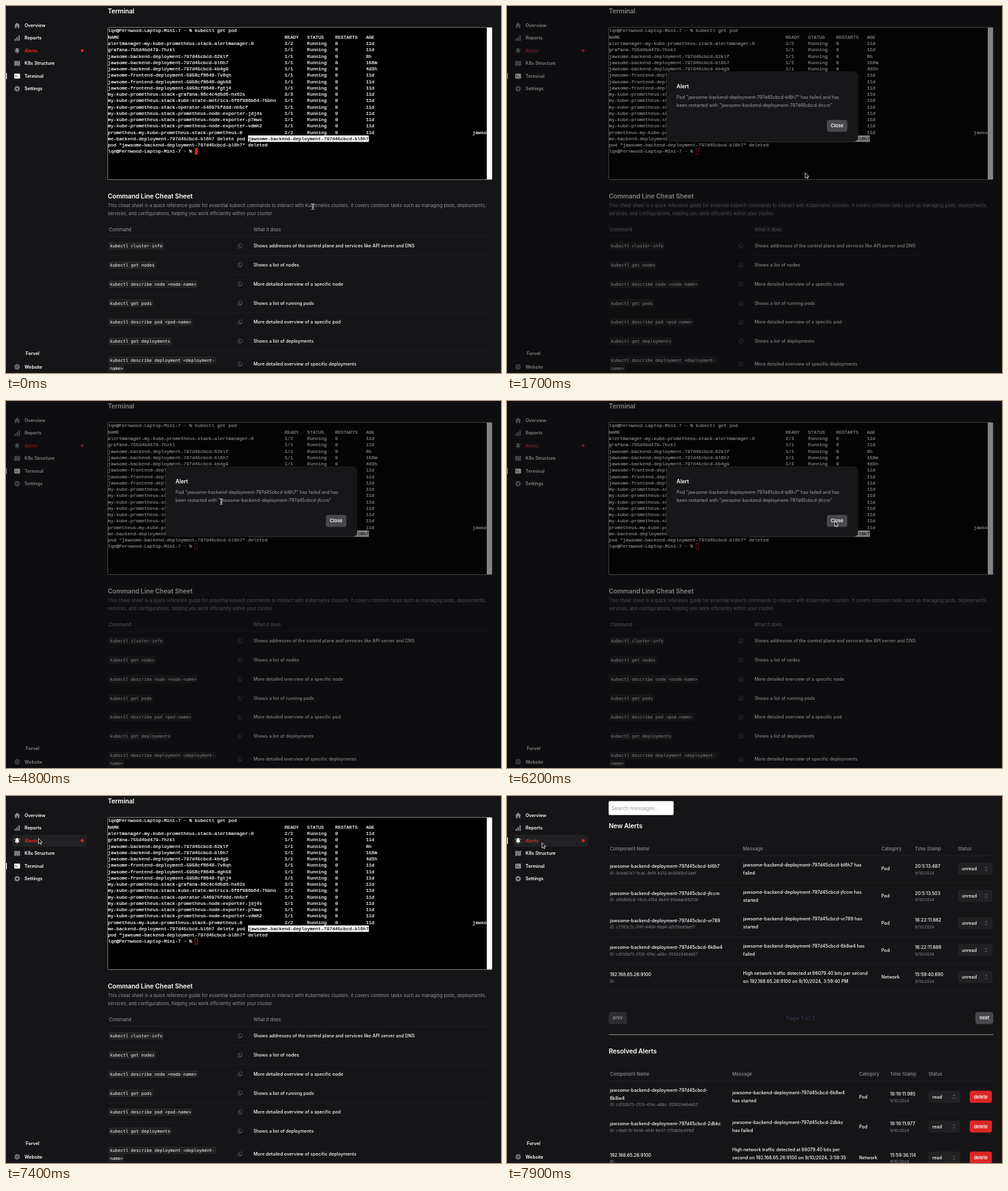
These frames come from a looping animation (800 by 593 pixels, 8000 ms). An HTML page:

```html
<!DOCTYPE html>
<html lang="en">
<head>
<meta charset="utf-8">
<title>Cluster terminal</title>
<style>
html, body { margin: 0; width: 100%; height: 100%; overflow: hidden; background: #151517; }
svg { display: block; width: 800px; height: 593px; font: 400 7.31px Inter, sans-serif; fill: #fff; }
text { white-space: pre; }
.nav { font-weight: 600; font-size: 7.3px; }
.head { font-weight: 500; font-size: 7.4px; fill: #8b8b93; }
.cell { font-weight: 500; font-size: 7.25px; }
.title { font-weight: 600; font-size: 10.44px; letter-spacing: -.012em; }
.note { font-size: 7.39px; fill: #94949c; }
.id { font-size: 6.4px; fill: #8b8b93; }
.btn { font-weight: 600; font-size: 7.4px; }
.tty { font: 7.557px 'Liberation Mono', monospace; stroke: #fff; stroke-width: .22px; }
.picked { fill: #000; stroke: #000; }
.code { font: 7.04px 'DejaVu Sans Mono', monospace; }
</style>
</head>
<body>
<svg id="stage" viewBox="0 0 800 593"></svg>
<script>
const esc = s => s.replace(/&/g, '&amp;').replace(/</g, '&lt;');
// y is the middle of the capitals
const text = (x, y, s, cls = 'cell', size = 7.3, extra = '') =>
  `<text x="${x}" y="${y + size * .364}" class="${cls}" ${extra}>${esc(s)}</text>`;
const rect = (x, y, w, h, fill, rx = 0, extra = '') =>
  `<rect x="${x}" y="${y}" width="${w}" height="${h}" fill="${fill}" rx="${rx}" ${extra}/>`;
const rule = (y, alpha = .06) => rect(164.5, y, 621, .6, `rgba(255,255,255,${alpha})`);
const title = (y, s) => text(164.5, y, s, 'title', 10.44);

// Sidebar
const GREY = '#8b8b93';
const icons = {
  home: '<path d="M5 .5L.4 5H1.5V9.5H4V6.5H6V9.5H8.5V5H9.6z"/>',
  bars: '<path d="M.8 6H2.8V9.5H.8zM4 3.5H6V9.5H4zM7.2 .5H9.2V9.5H7.2z"/>',
  bell: '<path d="M5 .7C2.4 .7 2.6 3 2.4 5L1.3 7.6H8.7L7.6 5C7.4 3 7.6 .7 5 .7zM3.6 8.2H6.4L5 9.7zM.3 4L1 1.4 1.6 1.7 1 4zM9.7 4L9 1.4 8.4 1.7 9 4z"/>',
  map: '<path d="M.5 1.5L3.3 .6V8.5L.5 9.4zM3.8 .6L6.2 1.5V9.4L3.8 8.5zM6.7 1.5L9.5 .6V8.5L6.7 9.4z"/>',
  prompt: '<rect x=".3" y="1" width="9.4" height="8" rx="1.3"/><path d="M2 3.2L3.7 4.7 2 6.2M4.6 6.3H6.6" fill="none" stroke="#151517" stroke-width=".9"/>',
  gear: '<circle cx="5" cy="5" r="2.6" fill="none" stroke="currentColor" stroke-width="2"/><circle cx="5" cy="5" r="4.1" fill="none" stroke="currentColor" stroke-width="1.3" stroke-dasharray="1.6 1.62"/>',
  globe: '<g fill="none" stroke="currentColor" stroke-width=".8"><circle cx="5" cy="5" r="4"/><ellipse cx="5" cy="5" rx="1.8" ry="4"/><path d="M1 5H9M1.6 3H8.4M1.6 7H8.4"/></g>'
};
const icon = (name, y) =>
  `<g id="${name}" transform="translate(13 ${y - 5})" fill="${GREY}" color="${GREY}">${icons[name]}</g>`;

function sidebar() {
  const items = [['home', 'Overview'], ['bars', 'Reports'], ['bell', 'Alerts'],
    ['map', 'K8s Structure'], ['prompt', 'Terminal'], ['gear', 'Settings']];
  return rect(10, 62.5, 121, 19.5, 'rgba(255,255,255,.05)', 4, 'id="hover"') +
    items.map(([name, label], i) => {
      const y = 31.2 + i * 20.5;
      return icon(name, y) + text(30, y, label, 'nav', 7.3, name == 'bell' ? 'fill="#e83030"' : '');
    }).join('') +
    '<circle cx="123.2" cy="72.2" r="2.4" fill="#dc2626"/>' +
    rect(0, 108, 1.3, 10.4, '#fff', .6, 'id="current"') +
    text(32, 561.5, 'Forvel', 'nav') + icon('globe', 583) + text(30, 583, 'Website', 'nav');
}

// Terminal page
const CH = 4.534, LINE = 10.26;
const tty = (col, row, s, cls = 'tty') => text(164.7 + col * CH, 40 + row * LINE, s, cls, 6.8);
const back = 'jawsome-backend-deployment-797d45cbcd-';
const front = 'jawsome-frontend-deployment-5958cf8648-';
const stack = 'my-kube-prometheus-stack-';
const exporter = stack + 'prometheus-node-exporter-';
const prompt = 'lqe@Fernwood-Laptop-Mini-7 ~ % ';

function shell() {
  const pods = [
    ['alertmanager-' + stack + 'alertmanager-0', '2/2'], ['grafana-755d4bd479-7hzkl'],
    [back + '62klf', '1/1', '8h'], [back + 'bl6h7', '1/1', '158m'], [back + 'kb4g9', '1/1', '4d3h'],
    [front + '7v8qh'], [front + 'dgh58'], [front + 'fgtj4'],
    [stack + 'grafana-86c4c4d5d6-hx62s', '3/3'], [stack + 'kube-state-metrics-6f6f986b64-75bnn'],
    [stack + 'operator-546975fddd-nh5cf'],
    [exporter + 'jdj4s'], [exporter + 'p7mws'], [exporter + 'vdmh2'],
    ['prometheus-' + stack + 'prometheus-0', '2/2']
  ];
  const columns = [0, 63, 71, 81, 92];
  const line = (cells, row) => cells.map((s, i) => tty(columns[i], row, s)).join('');
  const cut = back.slice(5) + 'bl6h7 delete pod ';
  return rect(164.5, 34.5, 621, 246, '#000', 1, 'stroke="#8c8c8c" stroke-width=".9"') +
    rect(777, 35, 8.3, 245, '#fff') +
    tty(0, 0, prompt + 'kubectl get pod') +
    line(['NAME', 'READY', 'STATUS', 'RESTARTS', 'AGE'], 1) +
    pods.map(([name, ready = '1/1', age = '11d'], i) =>
      line([name, ready, 'Running', '0', age], i + 2)).join('') +
    tty(130, 16, 'jawso') + tty(0, 17, cut) +
    rect(391.2, 209.2, 195.2, 10.3, '#fff') + tty(50, 17, back + 'bl6h7', 'tty picked') +
    tty(0, 18, `pod "${back}bl6h7" deleted`) + tty(0, 19, prompt) +
    rect(305.6, 229.8, 4.1, 9.8, '#e02020', 0, 'id="caret" stroke="#e02020" stroke-width=".8"');
}

const chip = (y, s) =>
  rect(166.3, y - 5.3, s.length * 4.24 + 3, 10.6, 'rgba(255,255,255,.05)', 2,
    'stroke="rgba(255,255,255,.13)" stroke-width=".6"') + text(168, y, s, 'code', 7);
const copyIcon = y =>
  `<path d="M377 ${y - 3.5}h3l1.5 1.5v3.7h-4.5zM377 ${y - 1.8}h-1.8v5.3h4.4v-1.8" fill="none" stroke="#626269" stroke-width=".7"/>`;

function terminalPage() {
  const rows = [
    ['cluster-info', 'Shows addresses of the control plane and services like API server and DNS'],
    ['get nodes', 'Shows a list of nodes'],
    ['describe node <node-name>', 'More detailed overview of a specific node'],
    ['get pods', 'Shows a list of running pods'],
    ['describe pod <pod-name>', 'More detailed overview of a specific pod'],
    ['get deployments', 'Shows a list of deployments'],
    ['describe deployment <deployment-', 'More detailed overview of specific deployments']
  ];
  return title(8.5, 'Terminal') + shell() + title(307.5, 'Command Line Cheat Sheet') +
    text(164.5, 322.5, 'This cheat sheet is a quick reference guide for essential kubectl commands to interact with Kubernetes clusters. It covers common tasks such as managing pods, deployments,', 'note') +
    text(164.5, 335.5, 'services, and configurations, helping you work efficiently within your cluster.', 'note') +
    text(166.3, 361.3, 'Command', 'head') + text(400, 361.3, 'What it does', 'head') +
    rows.map(([command, about], i) => {
      const last = i == 6, y = last ? 578.5 : 387.6 + i * 30.8;
      return rule(372 + i * 30.8, i ? .05 : .09) + chip(last ? 572.5 : y, 'kubectl ' + command) +
        copyIcon(y) + text(400, y, about);
    }).join('') + chip(585.3, 'name>');
}

// Alerts page
const select = (x, y, w, s) =>
  rect(x, y - 9.8, w, 19.6, 'rgba(255,255,255,.05)', 4) + text(x + 6.3, y, s) +
  `<path d="M${x + w - 12} ${y - 1.3}l1.8-1.8 1.8 1.8m0 2.6l-1.8 1.8-1.8-1.8" fill="none" stroke="${GREY}" stroke-width=".8"/>`;
const button = (x, y, w, s, fill, color = '#fff') =>
  rect(x, y - 9.8, w, 19.6, fill, 4) +
  text(x + w / 2, y, s, 'btn', 7.4, `text-anchor="middle" fill="${color}"`);
const heads = (y, xs) => ['Component Name', 'Message', 'Category', 'Time Stamp', 'Status']
  .map((s, i) => text(xs[i], y, s, 'head')).join('');

function alertRow(xs, y, { name, id = '', msg, kind = 'Pod', time, top = y - 6.5 }) {
  const names = [].concat(name), first = y - 4.3 - (names.length - 1) * 6.4;
  return names.map((s, i) => text(xs[0], first + i * 12.9, s)).join('') +
    text(xs[0], first + names.length * 12.9 - 2, 'ID: ' + id, 'id', 6.4) +
    msg.map((s, i) => text(xs[1], top + i * 13, s)).join('') +
    text(xs[2], y, kind) + text(xs[3], y - 4.4, time) +
    text(xs[3], y + 6.6, '9/10/2024', 'id', 6.4);
}

function alertsPage() {
  const newX = [166.3, 381.5, 605, 659.3, 728.5], oldX = [166.3, 364, 569, 619, 681];
  const traffic = 'High network traffic detected at 66079.40 bits per';
  const host = '192.168.65.26:9100';
  const pod = (tail, state, id, time) =>
    ({ name: back + tail, id, msg: [back + tail + ' has', state], time });
  const fresh = [
    pod('bl6h7', 'failed', '0cba67a7-5cac-4ef8-b212-bc6660c53aef', '20:5:13.487'),
    pod('jfccm', 'started', 'd5b809c8-74ce-410d-8e49-89adab492f26', '20:5:13.503'),
    pod('vr789', 'started', 'c7783c7c-7f41-4406-9dd4-d7cf3ed5bef7', '16:22:11.882'),
    pod('6k8w4', 'failed', 'cd132b73-2f33-47ec-a06c-355829484d07', '16:22:11.889'),
    { name: host, msg: [traffic + ' second', `on ${host} on 9/10/2024, 3:59:40 PM`],
      kind: 'Network', time: '15:59:40.690' }
  ];
  const resolved = [
    [486, { name: [back, '6k8w4'], id: 'cd132b73-2f33-47ec-a06c-355829484d07',
      msg: [back + '6k8w4', 'has started'], time: '16:19:11.985' }],
    [534, { name: back + '2dbkc', id: 'c18afc15-5e36-4541-8e37-175db0b491b5',
      msg: [back + '2dbkc', 'has failed'], time: '16:19:11.977' }],
    [584.3, { name: host, msg: [traffic, `second on ${host} on 9/10/2024, 3:59:35`, 'PM'],
      kind: 'Network', time: '15:59:36.114', top: 571.5 }]
  ];
  return rect(164.3, 8.3, 105, 22.4, '#fff', 2) +
    text(169, 19.6, 'Search messages...', '', 8.3, 'fill="#9a9ca3" font-size="8.3"') +
    title(48, 'New Alerts') + heads(85, newX) + rule(95.8, .09) +
    fresh.map((a, i) => {
      const y = 117.8 + i * 43.7;
      return alertRow(newX, y, a) + select(728.6, y, 56, 'unread') + rule(y + 21.8);
    }).join('') +
    button(164.3, 358.8, 29.5, 'prev', '#2d2d31', GREY) +
    text(451, 359, 'Page 1 of 2', '', 9, 'fill="#30374a" font-size="9" font-weight="500"') +
    button(757, 358.8, 29, 'next', '#47474c') +
    rect(164.3, 385.2, 621.5, .9, '#a3a3a3') +
    title(412.5, 'Resolved Alerts') + heads(449, oldX) + rule(460, .09) +
    resolved.map(([y, a]) => alertRow(oldX, y, a) + select(681, y, 51.5, 'read') +
      button(747.8, y, 36, 'delete', '#dc2626')).join('') +
    rule(510.5) + rule(558.5);
}

function dialog() {
  return rect(257.5, 106, 310, 113.5, '#17171a', 8, 'stroke="rgba(255,255,255,.07)" stroke-width=".6"') +
    text(274, 130.2, 'Alert', 'btn', 8.5, 'style="font-size:8.5px"') +
    text(274, 147.5, `Pod "${back}bl6h7" has failed and has`, '', 7.3, 'fill="#a1a1aa"') +
    text(274, 160.2, `been restarted with "${back}jfccm"`, '', 7.3, 'fill="#a1a1aa"') +
    button(517, 193.8, 33, 'Close', '#47474c');
}

const $ = id => document.getElementById(id);
$('stage').innerHTML = rect(0, 0, 800, 593, '#151517') + sidebar() +
  `<g id="terminal">${terminalPage()}</g><g id="alerts">${alertsPage()}</g>` +
  `<g id="modal">${rect(0, 0, 800, 593, 'rgba(9,9,11,.5)')}${dialog()}</g>` +
  '<path id="arrow" d="M0 0V8.6L2 6.8 3.3 9.6 4.7 9 3.4 6.2H6z" fill="#000" stroke="#fff" stroke-width=".8"/>' +
  '<path id="beam" d="M-2.4 -4.6Q0 -4.6 0 -3.2Q0 -4.6 2.4 -4.6M0 -3.2V3.2M-2.4 4.6Q0 4.6 0 3.2Q0 4.6 2.4 4.6M-1.3 1.2H1.3" fill="none" stroke="#ddd" stroke-width="1"/>';

// Pointer path: time, x, y
const path = [[0, 496, 324], [800, 496, 324], [1500, 482, 269.5], [1900, 482, 269.5],
  [2800, 376, 150], [3300, 376, 150], [4400, 348, 162.5], [5000, 348, 162.5],
  [6000, 529.5, 194], [6500, 529.5, 194], [7300, 52.5, 68.5], [7500, 52.5, 68.5],
  [7800, 56.5, 75.5], [8000, 56.5, 75.5]];
const clamp = v => Math.max(0, Math.min(1, v));
const show = (id, on) => $(id).style.display = on ? '' : 'none';

function pointer(t) {
  const i = path.findIndex(p => p[0] > t), [t0, x0, y0] = path[i - 1], [t1, x1, y1] = path[i];
  const u = (t - t0) / (t1 - t0), e = u * u * (3 - 2 * u);
  return [x0 + (x1 - x0) * e, y0 + (y1 - y0) * e];
}

function draw(t) {
  const [x, y] = pointer(t);
  const fade = clamp((t - 400) / 150) * clamp((6550 - t) / 150);
  const onAlerts = t >= 7600;
  const hover = !fade && x > 10 && x < 131 && y > 62 && y < 82;
  const overText = t < 400 || (fade > 0 && x > 272 && x < 542 && y > 142 && y < 166);
  show('terminal', !onAlerts);
  show('alerts', onAlerts);
  show('hover', hover);
  show('arrow', !overText);
  show('beam', overText);
  $('modal').style.opacity = fade;
  $('caret').setAttribute('fill', t < 400 ? '#e02020' : 'none');
  $('bell').setAttribute('fill', hover || onAlerts ? '#fff' : GREY);
  $('prompt').setAttribute('fill', onAlerts ? GREY : '#fff');
  $('current').setAttribute('y', onAlerts ? 67 : 108);
  for (const id of ['arrow', 'beam']) $(id).setAttribute('transform', `translate(${x} ${y})`);
}

const start = performance.now();
(function loop() {
  draw((performance.now() - start) % 8000);
  requestAnimationFrame(loop);
})();
</script>
</body>
</html>
```
